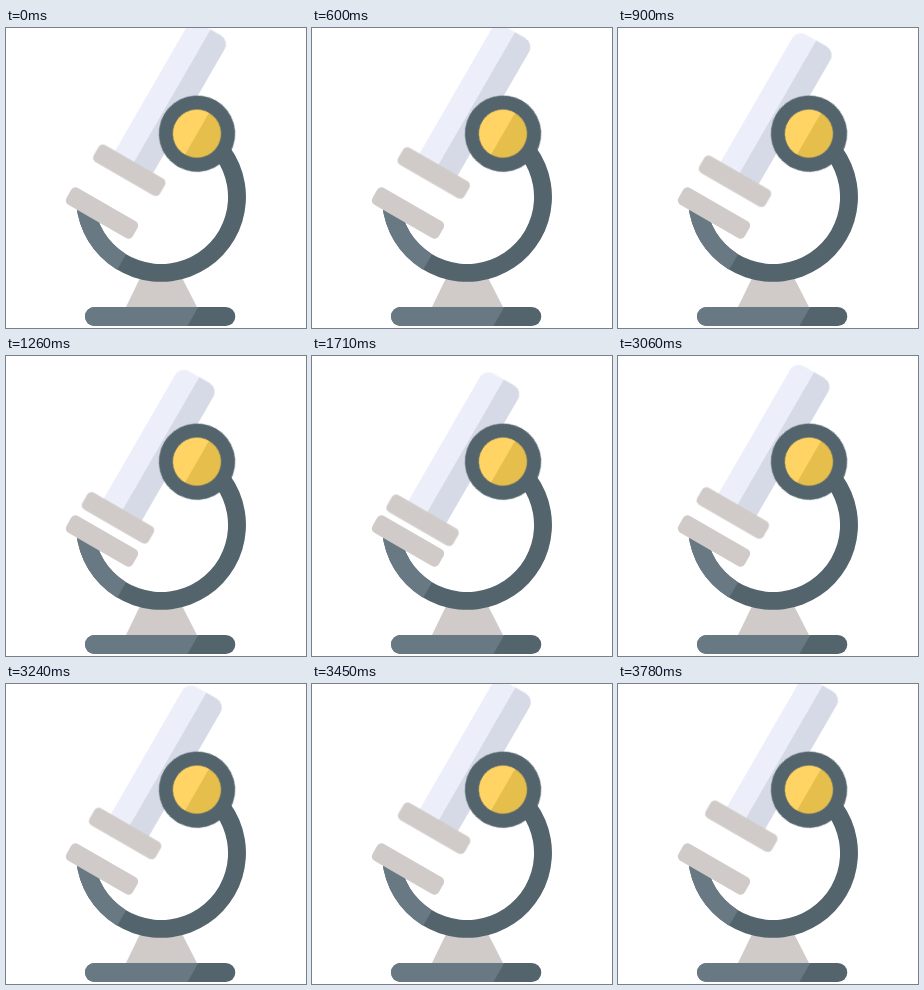
Animation, 300 px wide and 300 px high, one loop 4.5 s. Source, as an HTML page:

```html
<!DOCTYPE html>
<html lang="en">
<head>
<meta charset="utf-8">
<title>Microscope</title>
<style>
  html, body { margin: 0; width: 100%; height: 100%; overflow: hidden; background: #fff; }
  svg { display: block; width: 100%; height: 100%; }

  .steel { fill: #53646c; }
  .steel-light { fill: #697983; }
  .plate { fill: #d0cbc8; }
  .glass { fill: #d6dae6; }
  .glass-light { fill: #eceefa; }
  .brass { fill: #e6be4c; }
  .brass-light { fill: #ffd464; }

  /* The tube slides down along its own axis, rests, and returns. */
  .tube { animation: focus 4500ms infinite; }
  @keyframes focus {
    0%, 4% { transform: translate(0, 0); animation-timing-function: cubic-bezier(.55, 0, .35, 1); }
    38.667%, 56% { transform: translate(-12.7px, 22px); animation-timing-function: cubic-bezier(.6, 0, .4, 1); }
    84%, 100% { transform: translate(0, 0); }
  }
</style>
</head>
<body>
<svg viewBox="0 0 300 300" xmlns="http://www.w3.org/2000/svg">
  <defs>
    <clipPath id="base"><rect x="79" y="279" width="150.3" height="19" rx="9.5"/></clipPath>
    <clipPath id="arm">
      <path d="M70.3 176.4A85 85 0 1 0 223.8 119L209.2 129.6A67 67 0 1 1 88.3 174.8Z"/>
    </clipPath>
    <clipPath id="barrel"><rect x="-22" y="-162.5" width="44" height="190" rx="10"/></clipPath>
    <rect id="bar" x="-38.3" y="-9.7" width="76.6" height="19.4" rx="5"/>
  </defs>

  <path class="plate" d="M136 246L119.5 280H191.5L174 246Z"/>

  <g clip-path="url(#base)">
    <rect class="steel" x="70" y="270" width="170" height="30"/>
    <path class="steel-light" d="M70 270H197.5L180.2 300H70Z"/>
  </g>

  <g clip-path="url(#arm)">
    <rect class="steel" x="60" y="80" width="190" height="180"/>
    <path class="steel-light" d="M60 160H100L123 221L103 256H60Z"/>
  </g>

  <use href="#bar" class="plate" transform="translate(96 185) rotate(30)"/>

  <g class="tube">
    <g transform="translate(123.3 142.3) rotate(30)">
      <g clip-path="url(#barrel)">
        <rect class="glass-light" x="-22" y="-163" width="44" height="163"/>
        <rect class="glass" x="0" y="-163" width="22" height="163"/>
      </g>
      <use href="#bar" class="plate"/>
    </g>
  </g>

  <g transform="translate(191 105.7) rotate(30)">
    <circle class="steel" r="38.2"/>
    <circle class="brass" r="24"/>
    <path class="brass-light" d="M0 -24A24 24 0 0 0 0 24Z"/>
  </g>
</svg>
</body>
</html>
```
